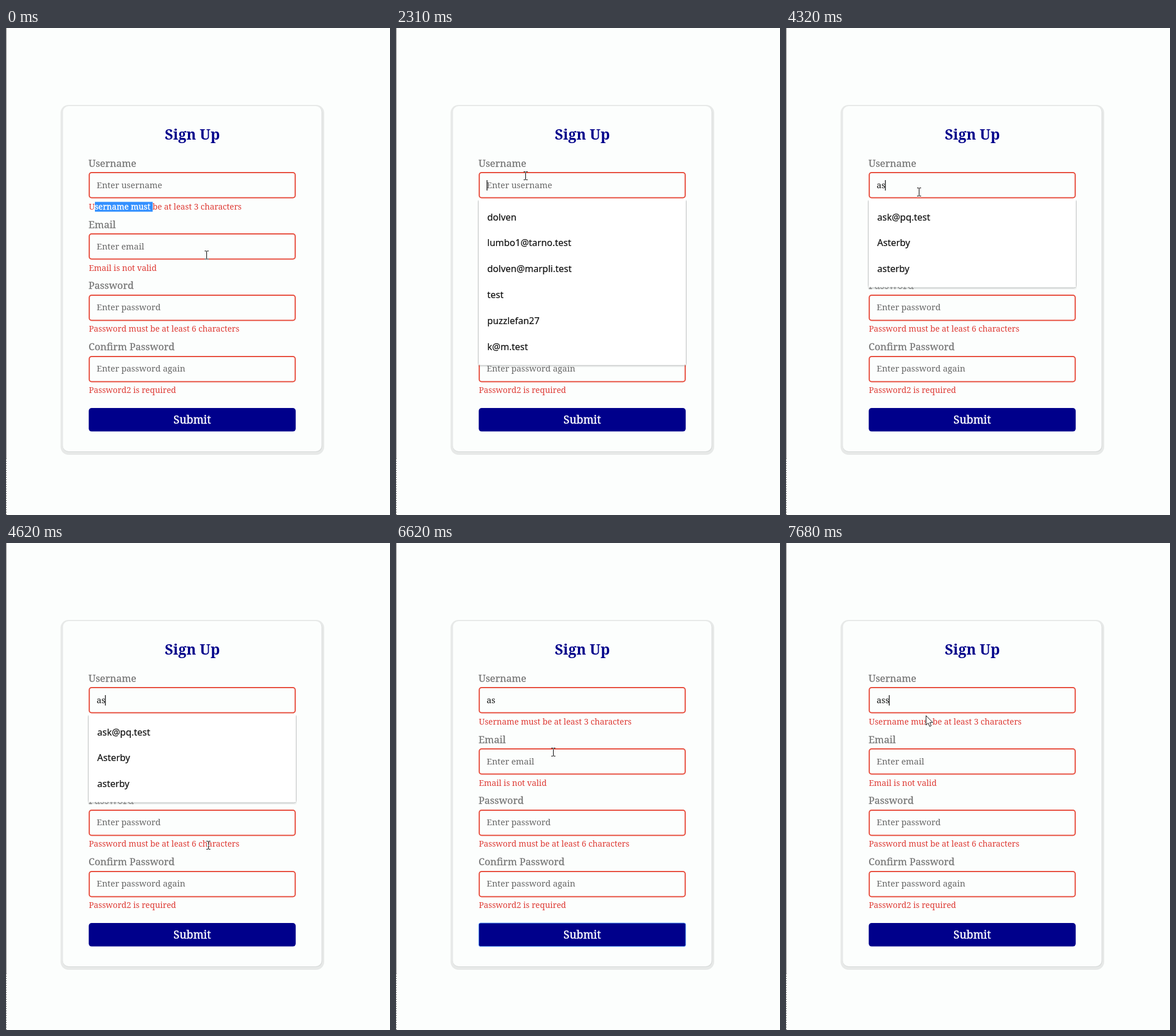
An HTML page for the animation above (8 s loop, 665 by 842 pixels).

```html
<!DOCTYPE html>
<html lang="en">
<head>
<meta charset="utf-8">
<title>Sign Up</title>
<style>
  html, body { margin: 0; width: 100%; height: 100%; overflow: hidden; background: #fcfefd; }
  svg { display: block; width: 100vw; height: 100vh; }
  text { font-family: "Noto Serif", serif; white-space: pre; }
  .title { font-size: 25px; font-weight: 600; fill: #00008b; text-anchor: middle; }
  .label { font-size: 17px; fill: #777; stroke: #777; stroke-width: .3; }
  .field { font-size: 14.8px; fill: #666; }
  .field.typed { fill: #111; }
  .error { font-size: 14.2px; fill: #de3a34; }
  .picked { font-size: 14.2px; fill: #fff; stroke: #fff; stroke-width: .4; }
  .submit { font-size: 19px; font-weight: 500; fill: #fff; stroke: #fff; stroke-width: .45; text-anchor: middle; }
  .option { font: 16px "Noto Sans", sans-serif; fill: #111; stroke: #111; stroke-width: .2; }
  .box { fill: none; stroke: #e74c3c; stroke-width: 2; }
  .beam { fill: none; stroke: #fff; mix-blend-mode: difference; }
</style>
</head>
<body>
<script>
const LOOP = 8000;
const BEAT = 134.5; // ms between screen refreshes
const NS = 'http://www.w3.org/2000/svg';

function add(parent, tag, attrs = {}, text) {
  const node = document.createElementNS(NS, tag);
  set(node, attrs);
  if (text !== undefined) node.textContent = text;
  parent.appendChild(node);
  return node;
}
function set(node, attrs) { for (const key in attrs) node.setAttribute(key, attrs[key]); }
const show = (node, on) => set(node, { visibility: on ? 'visible' : 'hidden' });

const svg = add(document.body, 'svg', { viewBox: '0 0 665 842' });
const rect = (parent, x, y, width, height, attrs = {}) =>
  add(parent, 'rect', { x, y, width, height, ...attrs });
const label = (parent, cls, x, y, text) => add(parent, 'text', { class: cls, x, y }, text);

// Page, card and its shadow
rect(svg, 0, 0, 665, 842, { fill: '#fcfefd' });
rect(svg, 0, 0, 1, 744, { fill: '#8c8c8c' });
add(svg, 'path', { d: 'M.5 744V842', stroke: '#666', 'stroke-dasharray': '2 2' });
rect(svg, 94.5, 133, 456.5, 605, { rx: 14, fill: '#e7e9e8' });
rect(svg, 98.5, 136, 449, 597, { rx: 10, fill: '#d6d9d8' });
rect(svg, 98.5, 135, 448, 597, { rx: 10, fill: '#fcfefd' });
label(svg, 'title', 322.7, 193, 'Sign Up');

// Form rows
const rows = [
  ['Username', 'Enter username', 'Username must be at least 3 characters'],
  ['Email', 'Enter email', 'Email is not valid'],
  ['Password', 'Enter password', 'Password must be at least 6 characters'],
  ['Confirm Password', 'Enter password again', 'Password2 is required'],
].map(([name, hint, error], i) => {
  const dy = Math.round(i * 105.7);
  label(svg, 'label', 143, 240 + dy, name);
  rect(svg, 144.2, 250 + i * 106, 356.6, 43.5, { class: 'box', rx: 4 });
  return {
    top: 249 + i * 106,
    base: 313.8 + dy,
    field: label(svg, 'field', 157, 277 + dy, hint),
    error: label(svg, 'error', 143.5, 313.8 + dy, error),
  };
});
const field = rows[0].field;

const button = rect(svg, 143.3, 657, 358.4, 40.6, { fill: '#00008b' });
label(svg, 'submit', 322.5, 684, 'Submit');

// Selected text: a highlight with white letters clipped to it
const highlight = rect(svg, 0, 0, 0, 17, { fill: '#3390ff' });
const clip = rect(add(add(svg, 'defs'), 'clipPath', { id: 'pick' }), 0, 0, 0, 17);
const picked = add(add(svg, 'g', { 'clip-path': 'url(#pick)' }), 'text', { class: 'picked', x: 143.5 });

function select({ base, error }, from, to) {
  const width = Math.max(0, to - from);
  for (const r of [highlight, clip]) set(r, { x: from, y: base - 13.2, width });
  set(picked, { y: base });
  picked.textContent = error.textContent;
}

const caret = rect(svg, 157, 263, 1.2, 18, { fill: '#000' });

// Suggestion list
const saved = ['dolven', 'lumbo1@tarno.test', 'dolven@marpli.test', 'test', 'puzzlefan27',
  'k@m.test', 'ask@pq.test', 'Asterby', 'asterby'];
const panel = add(svg, 'g');
const shade = rect(panel, 141.5, 297, 362, 0, { rx: 4, fill: '#000', opacity: .06 });
const edge = rect(panel, 142.5, 296, 360, 0, { rx: 4, fill: 'none', stroke: '#bfc2c2' });
const sheet = rect(panel, 143, 295, 359, 0, { fill: '#fff' });
const options = Array.from({ length: 6 }, (_, i) => label(panel, 'option', 158, 332.5 + i * 44.8, ''));

// Returns the bottom of the open list, or 0 when it is closed
function suggest(open, value) {
  const list = open ? saved.filter(s => s.toLowerCase().startsWith(value)).slice(0, 6) : [];
  set(panel, { display: list.length ? 'inline' : 'none' });
  if (!list.length) return 0;
  const h = list.length * 44.8 + 20.5;
  set(shade, { height: h });
  set(edge, { height: h - 1.5 });
  set(sheet, { height: h - 2 });
  options.forEach((o, i) => { o.textContent = list[i] || ''; });
  return 295 + h;
}

// Pointers
const beam = add(svg, 'path', {
  class: 'beam', d: 'M0 -6V6M-3.5 -7H-1M1 -7H3.5M-3.5 7H-1M1 7H3.5M-1 -6.5H1M-1 6.5H1',
});
const arrow = add(svg, 'path', {
  d: 'M0 0V16.2L3.7 12.8L6.3 18.6L9 17.4L6.5 11.8H11.6Z', fill: '#fff', stroke: '#111',
});

// Stops of the pointer: beat, x, y
const stops = [
  [0, 348, 393], [2, 262, 278], [4, 116, 414], [5, 166, 414], [7, 211, 414], [9, 186, 528],
  [12, 340, 440], [17, 224.5, 256], [18, 226, 265], [25, 226, 265], [32, 231, 284],
  [34, 351, 523], [38, 380, 731], [41, 330, 690], [44, 328, 690], [49, 273, 362],
  [52, 248, 267], [55, 242, 298],
];

function pointerAt(beat) {
  const next = stops.findIndex(s => s[0] > beat);
  if (next < 0) return stops[stops.length - 1].slice(1);
  const [b0, x0, y0] = stops[next - 1], [b1, x1, y1] = stops[next];
  const k = (beat - b0) / (b1 - b0);
  return [x0 + (x1 - x0) * k, y0 + (y1 - y0) * k];
}

const overText = (x, y) => x > 143 && rows.some(({ top, base, error }) =>
  (x < 502 && y > top && y < top + 45) ||
  (x < 145 + error.getComputedTextLength() && y > base - 12 && y < base + 2.9));

function draw(time) {
  const beat = Math.floor(time / BEAT);
  const within = (a, b) => beat >= a && beat < b;
  const [x, y] = pointerAt(beat);

  // Text dragged over with the mouse
  if (beat < 5) select(rows[0], 154, 254);
  else select(rows[1], 166, beat < 7 ? x : beat < 13 ? 211 : 0);

  // Typing
  const value = 'ass'.slice(0, [27, 30, 57].filter(b => beat >= b).length);
  field.textContent = value || 'Enter username';
  field.classList.toggle('typed', value !== '');
  set(caret, { x: 157 + (value ? field.getComputedTextLength() - .5 : 0) });
  show(caret, within(17, 21) || within(25, 40) || beat >= 52);

  const focus = within(40, 52);
  set(button, { rx: focus ? 3 : 5, stroke: focus ? '#5b9df5' : 'none' });
  const bottom = suggest(within(17, 41) || beat >= 52, value);

  const covered = y > 295 && y < bottom && x > 143 && x < 502;
  const text = !covered && overText(x, y);
  show(beam, text);
  show(arrow, !text);
  const move = p => `translate(${Math.round(x) + p} ${Math.round(y) + p})`;
  set(beam, { transform: move(-.5) });
  set(arrow, { transform: move(.5) });
}

const start = performance.now();
function loop() {
  draw((performance.now() - start) % LOOP);
  requestAnimationFrame(loop);
}
loop();
</script>
</body>
</html>
```
